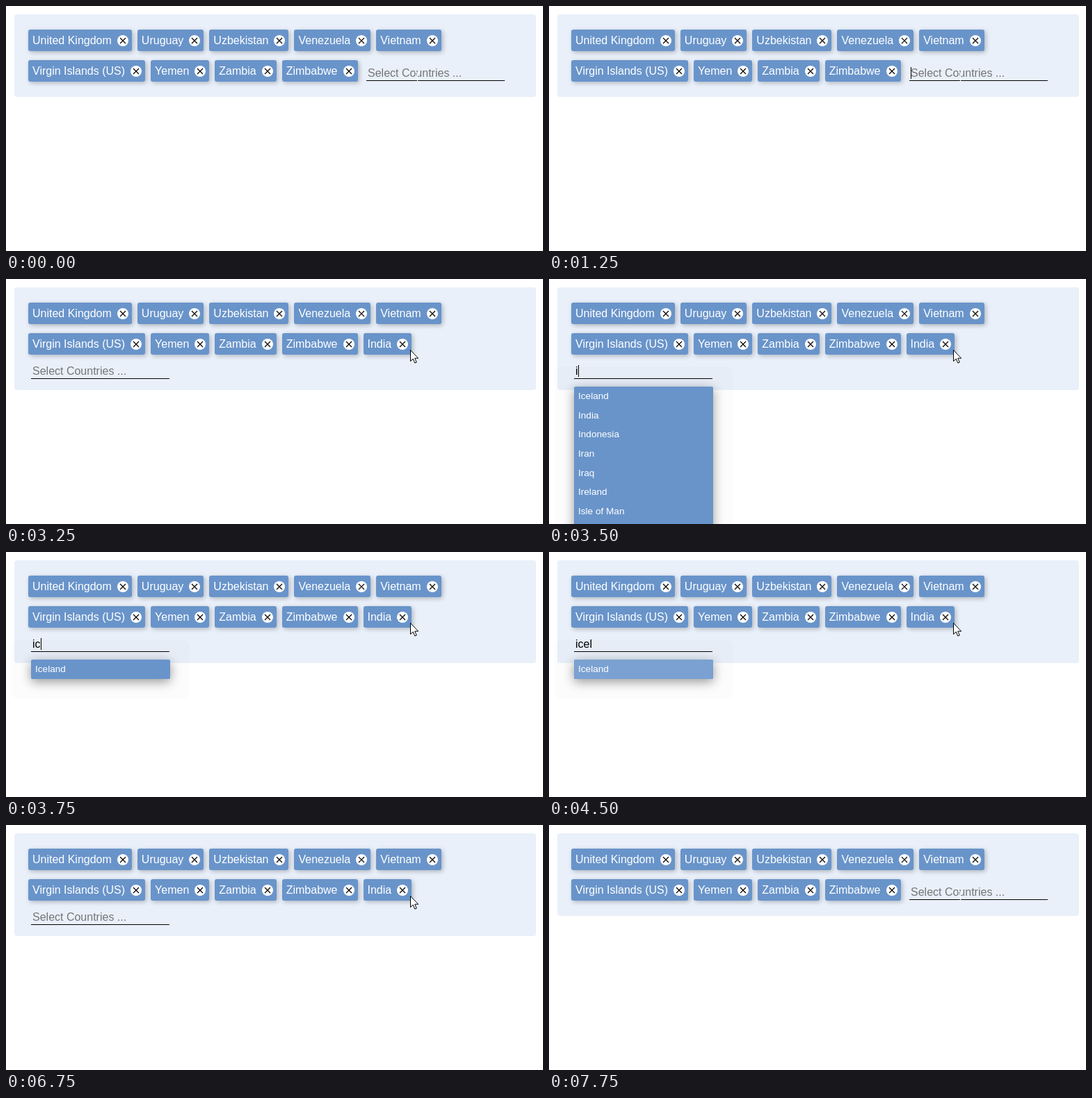
These frames come from a looping animation (772x353 px, 8000 ms). An HTML page:

```html
<!DOCTYPE html>
<html lang="en">
<head>
<meta charset="utf-8">
<title>Country picker</title>
<style>
html, body { margin: 0; width: 100%; height: 100%; overflow: hidden; background: #fff; }
body { position: relative; font: 16px/18px "Liberation Sans", Arial, sans-serif; }
body > * { position: absolute; }
#panel { left: 12px; top: 12px; width: 750px; border-radius: 4px; background: #e9f0fa; }
.row { left: 32px; display: flex; gap: 8px; }
.chip { display: flex; align-items: center; height: 31px; padding: 0 5px 0 6px; color: #fff;
  background: #6994ca; border-radius: 3px; box-shadow: 2px 2px 6px rgba(0,0,0,.25); white-space: nowrap; }
.chip svg { margin-left: 8px; }
#input { width: 197px; height: 19px; padding-left: 2px; border-bottom: 1px solid #000; white-space: pre; }
#input.empty { color: #757575; }
#caret { display: inline-block; vertical-align: top; height: 17px; border-left: 1px solid #000; margin-right: -1px; }
#list { width: 200px; overflow: hidden; border-radius: 2px; background: #6994ca; color: #fff;
  font-size: 13.6px; line-height: 27.65px;
  box-shadow: 0 4px 16px rgba(0,0,0,.4), 0 0 0 28px rgba(0,0,0,.012); }
#list div { padding-left: 6px; }
#list .active { background: #7aa1d1; }
.cursor { left: 0; top: 0; overflow: visible; }
</style>
</head>
<body>
<div id="panel"></div>
<div class="row" id="row1" style="top:34px"></div>
<div class="row" id="row2" style="top:78px"></div>
<div id="list"></div>
<div id="input"></div>
<svg class="cursor" id="arrow" width="13" height="21">
  <path d="M.5 .5V16.5L4.2 13L6.8 19L9.3 18L6.7 12.2H11.7Z" fill="#fff" stroke="#000"/>
</svg>
<svg class="cursor" id="beam" width="9" height="14">
  <path d="M1 .5H4M5 .5H8M4.5 1V13M1 13.5H4M5 13.5H8" fill="none" stroke="#fff"/>
</svg>
<script>
const LOOP = 8000;
const $ = id => document.getElementById(id);
const cross = `<svg width="16" height="16"><circle cx="8" cy="8" r="8" fill="#fff"/>
  <path d="M4 4L12 12M12 4L4 12" stroke="#000" stroke-width="1.2"/></svg>`;
const chips = names => names.map(n => `<span class="chip">${n}${cross}</span>`).join("");

const firstRow = ["United Kingdom", "Uruguay", "Uzbekistan", "Venezuela", "Vietnam"];
const secondRow = ["Virgin Islands (US)", "Yemen", "Zambia", "Zimbabwe"];
const iNames = ["Iceland", "India", "Indonesia", "Iran", "Iraq", "Ireland", "Isle of Man", "Israel", "Italy"];

const start = { text: "", caret: false, options: [], active: false, added: [], low: false, pointer: "beam", at: [587, 95] };
const closed = { text: "", options: [], active: false };
const on = { caret: true }, off = { caret: false };
const atIndia = [581, 102], atIceland = [668, 86];

// Each step overrides part of the state from its time on.
const steps = [
  [250, on], [750, off], [1250, on],
  [1750, { text: "in", options: ["India", "Indonesia"] }],
  [2250, off],
  [2500, { active: true, at: [587, 107] }],
  [2750, { ...closed, ...on, added: ["India"], low: true, pointer: "arrow", at: atIndia }],
  [3250, off],
  [3500, { ...on, text: "i", options: iNames }],
  [3750, { text: "ic", options: ["Iceland"] }],
  [4000, { text: "icel" }],
  [4500, { ...off, active: true }],
  [4750, { ...closed, ...on, added: ["India", "Iceland"], at: atIceland }],
  [5250, off], [5750, on],
  [6250, { added: ["India"] }],
  [6500, off],
  [6750, { at: atIndia }],
  [7000, on],
  [7250, { added: [] }],
  [7500, off],
  [7750, start]
];

function place(el, x, y) {
  el.style.left = x + "px";
  el.style.top = y + "px";
}

function draw(s) {
  const [x, y] = s.low ? [36, 124] : [518, 88];
  $("panel").style.height = (s.low ? 148 : 119) + "px";
  $("row2").innerHTML = chips([...secondRow, ...s.added]);

  const caret = s.caret ? '<span id="caret"></span>' : "";
  $("input").className = s.text ? "" : "empty";
  $("input").innerHTML = s.text ? s.text + caret : caret + "Select Countries ...";
  place($("input"), x, y);

  $("list").hidden = !s.options.length;
  $("list").innerHTML = s.options
    .map((n, i) => `<div class="${s.active && i === 0 ? "active" : ""}">${n}</div>`).join("");
  place($("list"), x, y + 31);

  for (const id of ["arrow", "beam"]) {
    $(id).style.display = id === s.pointer ? "" : "none";
    place($(id), ...s.at);
  }
}

$("row1").innerHTML = chips(firstRow);
const origin = performance.now();
let shown = -1;

function tick() {
  const t = (performance.now() - origin) % LOOP;
  const past = steps.filter(([time]) => time <= t);
  if (past.length !== shown) {
    shown = past.length;
    draw(Object.assign({}, start, ...past.map(([, change]) => change)));
  }
  requestAnimationFrame(tick);
}
tick();
</script>
</body>
</html>
```
